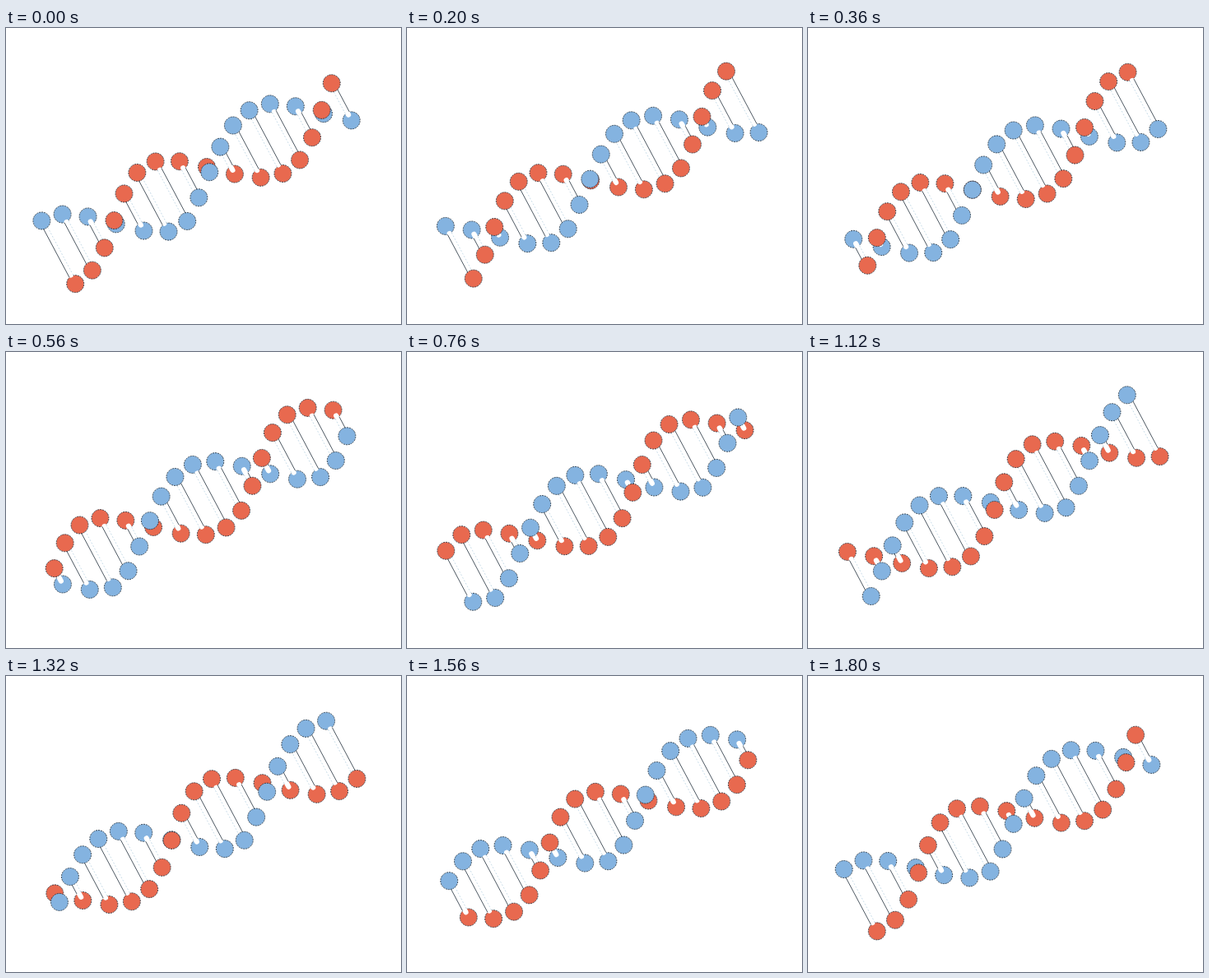
Write an HTML page with a canvas that moves like this. It is 480 by 360 pixels and loops after 1.84 s.

```html
<!DOCTYPE html>
<html lang="en">
<head>
<meta charset="utf-8">
<title>Rotating helix</title>
<style>
  html, body { margin: 0; width: 100%; height: 100%; overflow: hidden; background: #fff; }
  canvas { display: block; }
</style>
</head>
<body>
<canvas id="stage" width="480" height="360"></canvas>
<script>
const ctx = document.getElementById('stage').getContext('2d');

const STEP_MS = 40, STEPS = 46;
const RUNGS = 16, RUNGS_PER_TURN = 11;
const FIRST = { x: 63.8, y: 272.8 }, GAP = { x: 22.93, y: -12.2 };
const TILT = Math.atan2(GAP.y, GAP.x);
const SWING = 43.6, RADIUS = 10.5, ROD = 2.7;
const RED = '#e8694f', BLUE = '#84b3e0', INK = '#1c2a36', PALE = '#b9d3e2';
const rad = deg => deg * Math.PI / 180;

// Each strand runs slightly ahead during the second half of its turn.
function lead(deg, amount) {
  const x = (deg - 180) / 180;
  return x <= 0 ? 0 : amount * (1 - x) * (1 - Math.exp(-x / 0.08));
}

function ball(y, color) {
  ctx.beginPath();
  ctx.arc(0, y, RADIUS, 0, 2 * Math.PI);
  ctx.fillStyle = color;
  ctx.fill();
  ctx.strokeStyle = INK;
  ctx.lineWidth = 0.7;
  ctx.setLineDash([2, 1]);
  ctx.stroke();
  ctx.setLineDash([]);
}

function edge(x, from, to, color, dash) {
  ctx.beginPath();
  ctx.moveTo(x, from);
  ctx.lineTo(x, to);
  ctx.strokeStyle = color;
  ctx.lineWidth = 0.7;
  ctx.setLineDash(dash);
  ctx.stroke();
  ctx.setLineDash([]);
}

// The rod sits on top of the back ball and runs under the front one.
function rod(back, front, deg, side) {
  const dir = Math.sign(front - back) || 1;
  const inset = 2 + 10 * Math.abs(Math.cos(rad(deg)));
  const start = back + dir * Math.min(inset, Math.abs(front - back));
  ctx.beginPath();
  ctx.moveTo(0, start);
  ctx.lineTo(0, front);
  ctx.lineCap = 'round';
  ctx.lineWidth = 2 * ROD + 0.8;
  ctx.strokeStyle = '#fff';
  ctx.stroke();
  ctx.lineCap = 'butt';
  const rim = back + dir * RADIUS;
  if ((front - rim) * dir > 0) {
    edge(side * ROD, rim, front, INK, []);
    edge(-side * ROD, rim, front, PALE, [2, 2]);
  }
}

function rung(i, base) {
  const deg = (base + i * 360 / RUNGS_PER_TURN + 720) % 360;
  const red = SWING * Math.cos(rad(deg + lead(deg, 7)));
  const blue = -SWING * Math.cos(rad(deg + lead(deg, 23)));
  const redFront = deg < 180;
  const back = redFront ? blue : red, front = redFront ? red : blue;

  ctx.save();
  ctx.translate(FIRST.x + i * GAP.x, FIRST.y + i * GAP.y);
  ctx.rotate(TILT);
  ball(back, redFront ? BLUE : RED);
  rod(back, front, deg, i < 6 ? -1 : 1);
  ball(front, redFront ? RED : BLUE);
  ctx.restore();
}

function draw(ms) {
  const step = Math.floor(ms / STEP_MS) % STEPS;
  ctx.fillStyle = '#fff';
  ctx.fillRect(0, 0, 480, 360);
  for (let i = 0; i < RUNGS; i++) rung(i, step * 360 / STEPS - 5);
}

const start = performance.now();
function tick() {
  draw(Math.max(0, performance.now() - start));
  requestAnimationFrame(tick);
}
tick();
</script>
</body>
</html>
```
